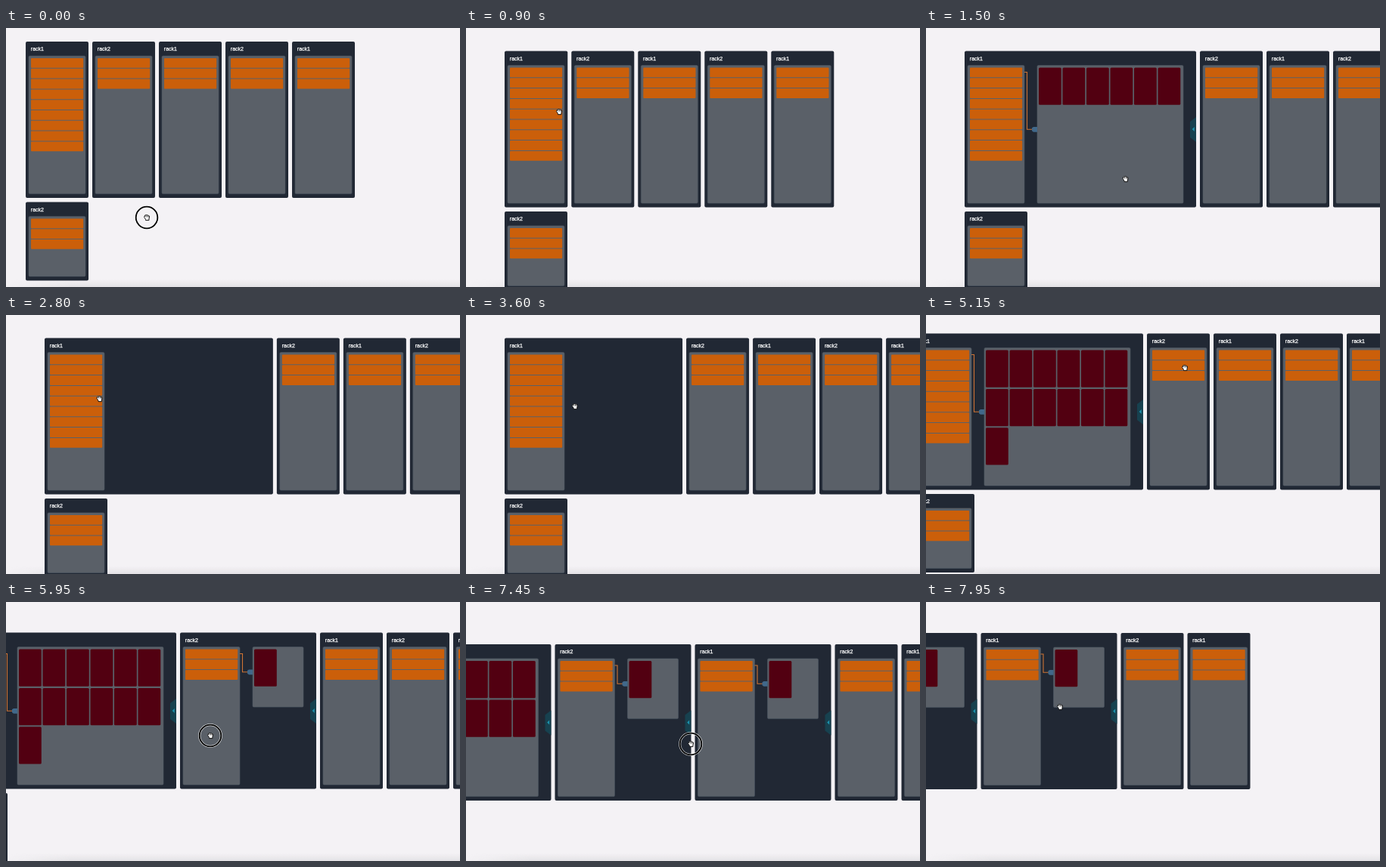
Animation, 600 px wide and 343 px high, one loop 8 s. Source, as an HTML page:

```html
<!DOCTYPE html>
<html lang="en">
<head>
<meta charset="utf-8">
<title>Racks</title>
<style>
  html, body { margin: 0; width: 100%; height: 100%; overflow: hidden; background: #f4f2f5; }
  svg { display: block; width: 600px; height: 343px; }
  text {
    font: 7px "Liberation Sans", Arial, sans-serif;
    fill: #fff; stroke: #fff; stroke-width: .25px;
  }
  .body { fill: #212834; }
  .panel { fill: #5a6068; stroke: #4e5863; stroke-width: .6px; }
  .server { fill: #cb5f0a; }
  .card { fill: #520011; }
  .wire { fill: none; stroke: #cf7434; stroke-width: 1.1px; }
  .plug { fill: #41688a; }
  .tab { fill: #17414f; }
  .arrow { fill: #1b93ad; }
</style>
</head>
<body>
<svg viewBox="0 0 600 343">
  <defs>
    <linearGradient id="down" x2="0" y2="1">
      <stop offset="0" stop-color="#dedde0" stop-opacity="0"/>
      <stop offset="1" stop-color="#dedde0" stop-opacity=".75"/>
    </linearGradient>
    <linearGradient id="across">
      <stop offset="0" stop-color="#000"/>
      <stop offset=".14" stop-color="#fff"/>
    </linearGradient>
    <mask id="fade"><rect y="330" width="600" height="13" fill="url(#across)"/></mask>
  </defs>
  <rect y="333" width="600" height="10" fill="url(#down)" mask="url(#fade)"/>
  <g id="world"></g>
  <g id="cursor">
    <g id="ring" fill="none">
      <circle r="14.3" stroke="#fff" stroke-opacity=".75" stroke-width="3.2"/>
      <circle r="14.3" stroke="#000" stroke-width="1.8"/>
    </g>
    <path d="M-2.4 .9L-3.5-.6Q-3.6-1.8-2.4-1.5L-2.6-2.8Q-2-3.8-1.1-3.1Q-.2-4 .7-3.1Q1.8-3.6 2.2-2.5Q3.6-2.5 3.5-1L2.9 2V3.6H-1.5V2.6Z"
      fill="#fff" stroke="#111" stroke-width="1" stroke-linejoin="round"/>
    <path d="M-1-2.8V-.6M.7-2.8V-.6M2.1-2.3V-.5" stroke="#111" stroke-width=".7"/>
  </g>
</svg>
<script>
const LOOP = 8000, SLIDE = 300, CARD_STEP = 60, PRESS = 75;
const CLOSED = 83, PITCH_X = 31.5, PITCH_Y = 51.4, GAP = 5;
const TALL = 207, SHORT = 104;
const byId = id => document.getElementById(id);

function add(parent, tag, attrs) {
  const node = document.createElementNS("http://www.w3.org/2000/svg", tag);
  for (const key in attrs) node.setAttribute(key, attrs[key]);
  return parent.appendChild(node);
}

const box = (parent, cls, x, y, width, height, rx = 1) =>
  add(parent, "rect", { class: cls, x, y, width, height, rx });

const show = (node, on) => { node.style.display = on ? "" : "none"; };
const place = (node, x, y) => node.setAttribute("transform", `translate(${x} ${y})`);
const innerHeight = outer => outer - 24.4;

// Contents shown to the right of the servers once a rack is fully open.
function buildDetail(group, count) {
  const columns = Math.max(2, Math.min(6, count));
  const width = columns * PITCH_X + 4;
  const height = innerHeight(count > columns ? TALL : SHORT);
  const right = 113 + width, middle = TALL / 2, port = 12.5 + height / 2;
  const detail = add(group, "g", {});
  box(detail, "panel", 96, 19, width, height, 1.5);
  add(detail, "path", { class: "wire", d: `M79 28H82.5V${port}H90` });
  add(detail, "path", { class: "plug", d: `M89 ${port - 2}l2-1.4h5v6.8h-5l-2-1.4Z` });
  add(detail, "path", { class: "tab", d: `M${right} ${middle - 16}l-8 6v21l8 6Z` });
  add(detail, "path", { class: "arrow", d: `M${right - 5.3} ${middle}l3-3v6Z` });
  const cards = Array.from({ length: count }, (_, i) =>
    box(detail, "card", 98 + i % columns * PITCH_X, 22 + Math.floor(i / columns) * PITCH_Y,
      PITCH_X - 1.7, PITCH_Y - 2.1, 1.5));
  return { detail, cards, openWidth: right };
}

function buildRack({ name, servers = 3, height = TALL, toggles = [], cards = 0 }) {
  const group = add(byId("world"), "g", {});
  const body = box(group, "body", 0, 0, CLOSED, height, 2);
  add(group, "text", { x: 6.8, y: 12.3 }).textContent = name;
  box(group, "panel", 4, 19, 75, innerHeight(height), 1.5);
  for (let i = 0; i < servers; i++) box(group, "server", 7, 22 + i * 13.8, 69.2, 12.8);
  return { group, body, toggles, ...(cards && buildDetail(group, cards)) };
}

const row = [
  { name: "rack1", servers: 9, toggles: [880, 2751, 3430], cards: 13 },
  { name: "rack2", toggles: [5250], cards: 1 },
  { name: "rack1", toggles: [6400], cards: 1 },
  { name: "rack2" },
  { name: "rack1" }
].map(buildRack);
const lower = buildRack({ name: "rack2", height: SHORT });
const clicks = row.flatMap(rack => rack.toggles);

// The pointer's path; dragging takes the racks along.
const origin = { x: 26, y: 18 }, hand = { x: 186, y: 251 };
const move = (from, to, x, y) => ({ from, to, x, y });
const drag = (...args) => ({ ...move(...args), dragging: true });
const gestures = [
  drag(0, 450, 211, 263.5),
  move(500, 800, 123, 111),
  move(950, 1400, 263.5, 200),
  move(1900, 2600, 123.5, 111),
  move(3500, 4100, 290, 193.5),
  drag(4350, 4800, 220, 187.5),
  move(4850, 5150, 342, 70),
  move(5300, 5570, 332, 161),
  drag(5600, 5950, 270, 177),
  move(6020, 6320, 460, 84),
  move(6500, 7000, 409.5, 172.5),
  drag(7050, 7450, 297, 188),
  move(7460, 7500, 407, 154),
  drag(7500, 7790, 177, 139)
];

const clamp = u => Math.max(0, Math.min(1, u));
const cubic = u => u < .5 ? 4 * u ** 3 : 1 - 4 * (1 - u) ** 3;
const glide = u => (u + u * u * (3 - 2 * u)) / 2;

function follow(t) {
  const pan = { ...origin }, pointer = { ...hand };
  let pressed = clicks.some(time => t >= time - PRESS && t < time);
  for (const { from, to, x, y, dragging } of gestures) {
    if (t < from) break;
    const k = glide(clamp((t - from) / (to - from)));
    const dx = (x - pointer.x) * k, dy = (y - pointer.y) * k;
    for (const point of dragging ? [pan, pointer] : [pointer]) {
      point.x += dx;
      point.y += dy;
    }
    if (dragging && t < to + 10) pressed = true;
  }
  return { pan, pointer, pressed };
}

function drawRack(rack, x, y, t) {
  place(rack.group, x, y);
  if (!rack.detail) return CLOSED;
  const past = rack.toggles.filter(time => time <= t);
  const opening = past.length % 2 === 1;
  const since = past.length ? t - past[past.length - 1] : Infinity;
  const moved = cubic(clamp(since / SLIDE));
  const width = CLOSED + (rack.openWidth - CLOSED) * (opening ? moved : 1 - moved);
  rack.body.setAttribute("width", width);
  show(rack.detail, opening && since >= SLIDE);
  rack.cards.forEach((card, i) => show(card, since >= SLIDE + i * CARD_STEP));
  return width;
}

function draw(t) {
  const { pan, pointer, pressed } = follow(t);
  let x = pan.x;
  for (const rack of row) x += drawRack(rack, x, pan.y, t) + GAP;
  drawRack(lower, pan.x, pan.y + TALL + GAP + .4, t);
  place(byId("cursor"), pointer.x, pointer.y);
  show(byId("ring"), pressed);
}

const start = performance.now();
function tick() {
  draw((performance.now() - start) % LOOP);
  requestAnimationFrame(tick);
}
tick();
</script>
</body>
</html>
```
